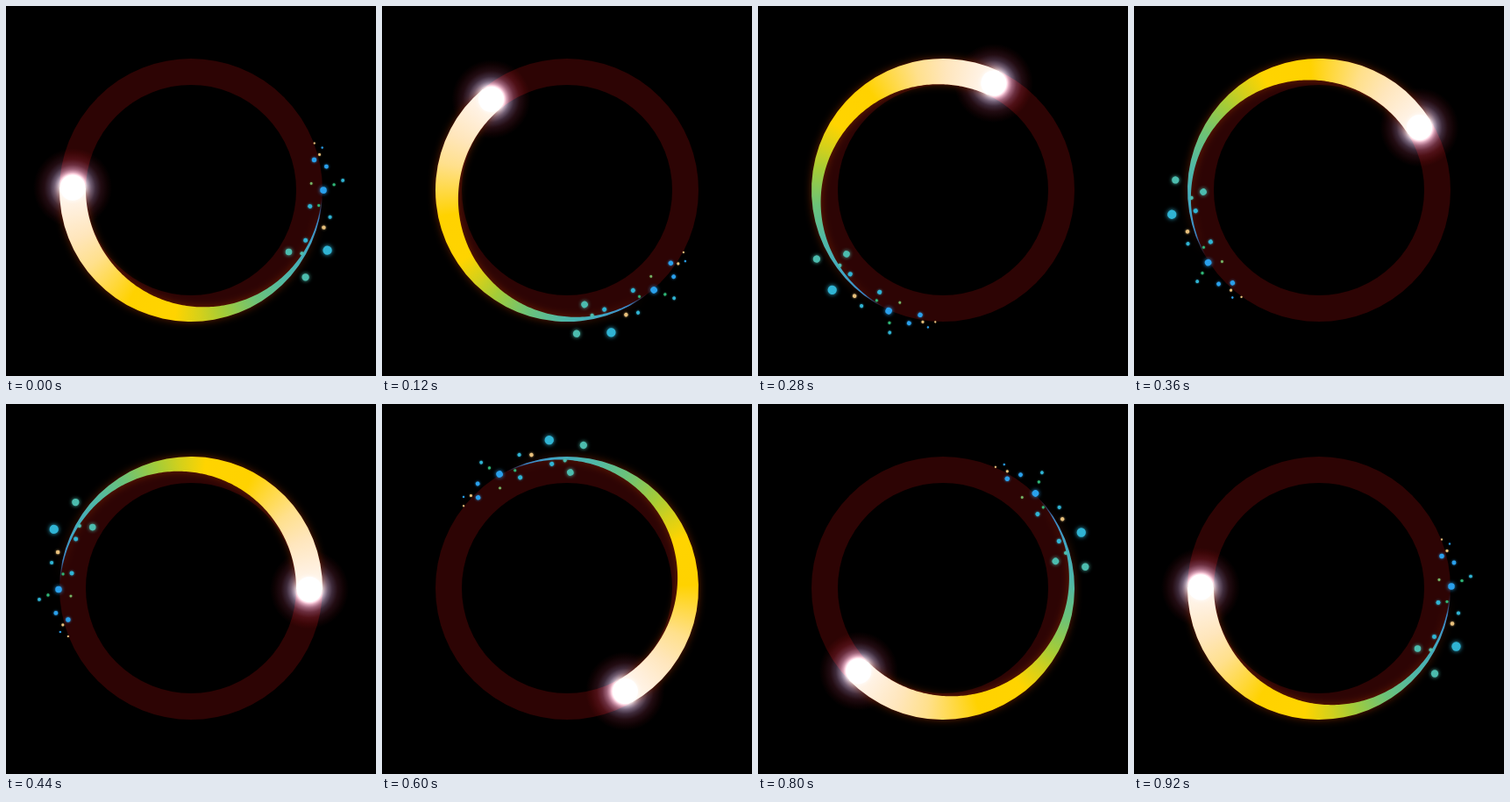
Animation, 422 px wide and 422 px high, one loop 960 ms. Source, as an HTML page with a canvas:

```html
<!DOCTYPE html>
<html lang="en">
<head>
<meta charset="utf-8">
<title>Comet ring</title>
<style>
  html, body { margin: 0; width: 100%; height: 100%; overflow: hidden; background: #000; }
  canvas { display: block; }
</style>
</head>
<body>
<canvas id="stage" width="422" height="422"></canvas>
<script>
const ctx = document.getElementById('stage').getContext('2d');
const LOOP = 960, STEP = 40, HALF = 440, END = 920;
const CX = 211, CY = 210, OUTER = 150, INNER = 120, MID = 135;
const TAU = Math.PI * 2;
const rad = deg => deg * Math.PI / 180;

// Trail colours by degrees behind the head.
const trailStops = [
  [0, '#fffaf6'], [10, '#fff0de'], [24, '#ffe6bc'], [38, '#ffe08c'],
  [52, '#ffd83c'], [62, '#ffd200'], [84, '#ffd400'], [96, '#d2d01c'],
  [106, '#a4cc38'], [122, '#6cc278'], [138, '#50b8a6'],
  [156, '#40a6c4'], [168, '#3a86c8'], [178, 'rgba(48,100,180,0)']
];

const BLUE = '#2aa0ec', CYAN = '#30b4d4', TEAL = '#4cbcae', GREEN = '#30b878', PEACH = '#e8c07c';
// x, y, radius, colour
const sparks = [
  [351, 154.5, 1.1, PEACH], [360, 159.5, 1.2, BLUE], [357, 167.5, 1.6, PEACH],
  [351, 173.5, 2.9, BLUE], [365, 181, 2.6, BLUE], [384, 196.5, 2, CYAN],
  [374, 201.5, 1.7, GREEN], [348, 200.5, 1.5, '#78b868'], [362, 208, 4.1, BLUE],
  [347, 226.5, 2.7, CYAN], [357, 225.5, 1.6, GREEN], [370, 238.5, 2.2, CYAN],
  [363, 250.5, 2.4, PEACH], [342.5, 265.5, 2.7, CYAN], [323.5, 279, 4.1, TEAL],
  [338.5, 280.5, 2.2, TEAL], [367.5, 276.5, 5.6, CYAN], [343, 307.5, 4.5, TEAL]
];

function spin(t) {
  return t < HALF
    ? 0.8 + 179.4 * t / HALF
    : 180.2 + 179.8 * (t - HALF) / (END - HALF);
}

function buildTrail() {
  const path = new Path2D();
  path.arc(0, 0, OUTER, 0, Math.PI);
  // The inner edge is a circle shifted towards the tail.
  const shift = 14.6, radius = INNER + shift;
  for (let deg = 180; deg >= 0; deg--) {
    const a = rad(deg + 6);
    const r = shift * Math.cos(a) + Math.sqrt(radius ** 2 - (shift * Math.sin(a)) ** 2);
    path.lineTo(r * Math.cos(rad(deg)), r * Math.sin(rad(deg)));
  }
  path.closePath();
  return path;
}

const trail = buildTrail();
const trailFill = ctx.createConicGradient(0, 0, 0);
for (const [behind, color] of trailStops) trailFill.addColorStop((180 - behind) / 360, color);

const halo = ctx.createRadialGradient(-MID, 0, 0, -MID, 0, 45);
[
  [0, 'rgb(255,255,255)'], [0.32, 'rgb(240,228,240)'], [0.38, 'rgb(176,158,180)'],
  [0.47, 'rgb(112,94,116)'], [0.58, 'rgb(62,42,58)'], [0.72, 'rgb(34,12,18)'],
  [0.88, 'rgb(14,2,3)'], [1, 'rgb(0,0,0)']
].forEach(([at, color]) => halo.addColorStop(at, color));

function disc(x, y, r, fill) {
  ctx.fillStyle = fill;
  ctx.beginPath();
  ctx.arc(x, y, r, 0, TAU);
  ctx.fill();
}

function glow(color, blur) {
  ctx.shadowColor = color;
  ctx.shadowBlur = blur;
}

function drawComet() {
  ctx.save();
  ctx.rotate(rad(0.4));
  ctx.globalCompositeOperation = 'lighter';
  disc(-MID, 0, 45, halo);
  ctx.globalCompositeOperation = 'source-over';
  glow('rgba(130,40,0,0.75)', 10);
  ctx.fillStyle = trailFill;
  ctx.fill(trail);
  glow('#fff', 5);
  disc(-MID, 0, 14.5, '#fff');
  ctx.restore();
}

function drawSparks() {
  ctx.save();
  for (const [x, y, r, color] of sparks) {
    glow(color, r);
    disc(x - CX, y - CY, r * 0.92, color);
  }
  ctx.restore();
}

function draw(t) {
  ctx.setTransform(1, 0, 0, 1, 0, 0);
  ctx.fillStyle = '#000';
  ctx.fillRect(0, 0, 422, 422);
  ctx.translate(CX, CY);
  ctx.strokeStyle = '#2d0404';
  ctx.lineWidth = OUTER - INNER;
  ctx.beginPath();
  ctx.arc(0, 0, MID, 0, TAU);
  ctx.stroke();
  ctx.rotate(rad(spin(t)));
  drawComet();
  drawSparks();
}

function tick() {
  const t = performance.now() % LOOP;
  draw(Math.floor(t / STEP) * STEP);
  requestAnimationFrame(tick);
}
tick();
</script>
</body>
</html>
```
